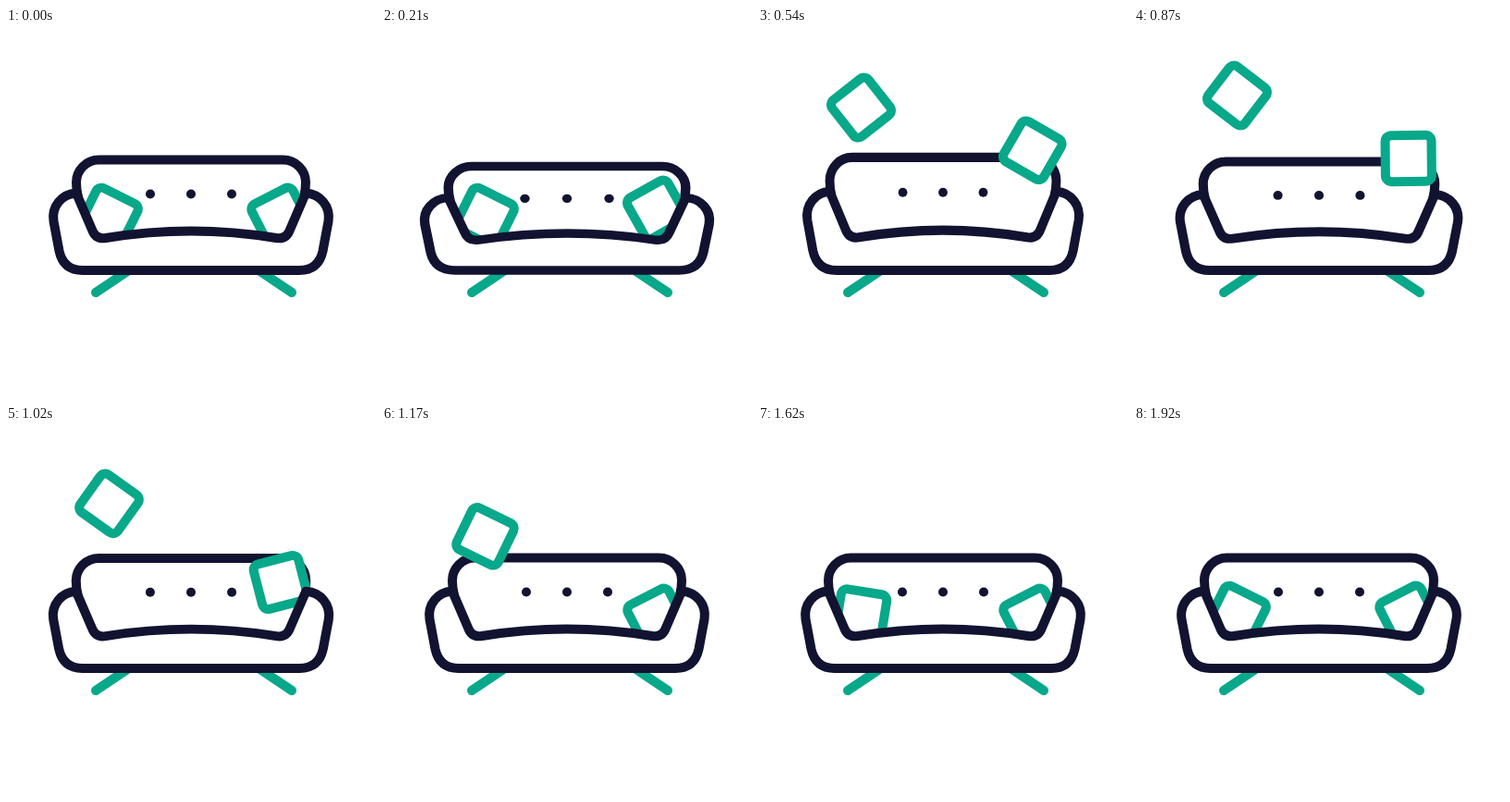
Animation of 400 by 400 pixels, one loop 3950 ms. Source, as an HTML page:

```html
<!DOCTYPE html>
<html lang="en">
<head>
<meta charset="utf-8">
<title>Sofa</title>
<style>
  html, body { margin: 0; width: 100%; height: 100%; overflow: hidden; background: #fff; }
  svg { display: block; width: 100%; height: 100%; }
  .line { fill: #fff; stroke: #121331; stroke-width: 10; stroke-linejoin: round; }
  .accent { fill: #fff; stroke: #08a88a; stroke-width: 10; stroke-linecap: round; }
  .dot { fill: #121331; }
</style>
</head>
<body>
<svg viewBox="0 0 400 400">
  <path class="accent" d="M97 286L132 262.5M309 286L274 262.5"/>
  <g class="body">
    <path class="line" d="M78 183Q76 175 76 167A24.5 24.5 0 0 1 100.5 142.5H299.5A24.5 24.5 0 0 1 324 167Q324 175 322 183"/>
    <circle class="dot" cx="156" cy="179.5" r="5"/>
    <circle class="dot" cx="200" cy="179.5" r="5"/>
    <circle class="dot" cx="244" cy="179.5" r="5"/>
  </g>
  <rect id="left" class="accent" x="-25" y="-25" width="50" height="50" rx="6.5"/>
  <rect id="right" class="accent" x="-25" y="-25" width="50" height="50" rx="6.5"/>
  <g class="body">
    <path class="line" d="M76 178.5C60 179.5 49 193 51.5 209L57.5 241Q62 262 83 262H317Q338 262 342.5 241L348.5 209C351 193 340 179.5 324 178.5L307 218Q303 229 292 227Q200 212 108 227Q97 229 93 218Z"/>
  </g>
</svg>
<script>
const LOOP = 3950, STEP = 30, END = 1920;
const REST_Y = 204, FLOOR = 262;
const $ = id => document.getElementById(id);
const bodies = document.querySelectorAll('.body');

const part = (t, a, b) => Math.min(1, Math.max(0, (t - a) / (b - a)));
const mix = (a, b, p) => a + (b - a) * p;
const smooth = p => p * p * (3 - 2 * p);

// Sofa squash: [time, amount], positive is wider and lower
const squashKeys = [[0, 0], [185, .036], [360, .0125], [540, -.0125], [610, -.012],
  [800, .013], [870, .01], [1080, 0], [1350, 0], [1440, .011], [1600, 0], [LOOP, 0]];

function squash(t) {
  const i = squashKeys.findIndex(k => k[0] > t);
  const [a, va] = squashKeys[i - 1], [b, vb] = squashKeys[i];
  return mix(va, vb, smooth(part(t, a, b)));
}

function leftPose(t) {
  const up = 1 - part(t, 270, 830), down = part(t, 870, 1362);
  if (t < 870) return [mix(73, REST_Y, up ** 3.5), mix(-52.5, 26.5, up ** 2.6)];
  const tip = smooth(part(t, 1362, END));
  return [mix(73, REST_Y, down ** 2.1), mix(-52.5, -94.5, down ** 2.6) + 31 * tip];
}

// Thrown in an arc, lands a little low, then settles
function rightPose(t) {
  const p = part(t, 185, 1155), settle = smooth(part(t, 1620, END));
  return [REST_Y + 3 * (p - settle) - 78.5 * 4 * p * (1 - p), -27 - 90 * p];
}

function place(el, x, [y, angle]) {
  el.setAttribute('transform', `translate(${x} ${y}) rotate(${angle})`);
}

function draw(ms) {
  const t = Math.min(END, Math.floor(ms % LOOP / STEP) * STEP);
  const q = squash(t);
  const pose = `translate(200 ${FLOOR}) scale(${1 + q} ${1 - 1.7 * q}) translate(-200 ${-FLOOR})`;
  bodies.forEach(g => g.setAttribute('transform', pose));
  place($('left'), 111.5, leftPose(t));
  place($('right'), 296.7, rightPose(t));
}

const start = performance.now();
function tick() {
  draw(performance.now() - start);
  requestAnimationFrame(tick);
}
tick();
</script>
</body>
</html>
```
